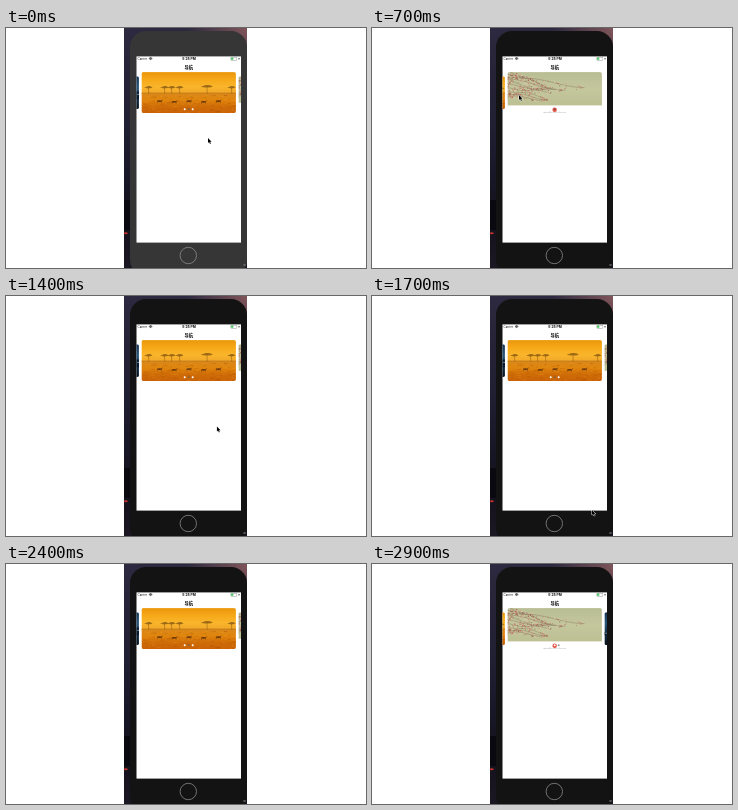
An HTML page with a canvas for the animation above (3 s loop, 360 by 240 pixels).

```html
<!DOCTYPE html>
<html lang="zh">
<head>
<meta charset="utf-8">
<style>
html, body { margin: 0; width: 100%; height: 100%; overflow: hidden; background: #fff; }
canvas { display: block; width: 360px; height: 240px; }
</style>
</head>
<body>
<canvas id="stage" width="360" height="240"></canvas>
<script>
const c = document.getElementById('stage').getContext('2d');
const LOOP = 3000, STEP = 100, MID = 182.7, PITCH = 97;
const CARD_W = 94.5, CARD_H = 41, CARD_Y = 64.6;

// Eased progress from 0 to 1 between two times.
function ramp(t, start, end) {
  const k = Math.min(1, Math.max(0, (t - start) / (end - start)));
  return k * k * (3 - 2 * k);
}

// Swipe forward, drag back, then advance automatically.
const pageAt = t => 1 + ramp(t, 500, 700) - ramp(t, 940, 1340) + ramp(t, 2400, 2800);

const cursorAt = t => [
  202 - 55 * ramp(t, 500, 700) + 57 * ramp(t, 750, 1100) + 16 * ramp(t, 1150, 1700),
  110 - 43 * ramp(t, 0, 450) + 147 * ramp(t, 1150, 1700)
];

function random(seed) {
  return () => (seed = (seed * 16807) % 2147483647) / 2147483647;
}

function rect(x, y, w, h, fill) {
  c.fillStyle = fill;
  c.fillRect(x, y, w, h);
}

function rounded(x, y, w, h, r, fill) {
  c.beginPath();
  c.roundRect(x, y, w, h, r);
  c.fillStyle = fill;
  c.fill();
}

function oval(x, y, rx, ry, fill) {
  c.beginPath();
  c.ellipse(x, y, rx, ry, 0, 0, 7);
  c.fillStyle = fill;
  c.fill();
}

function arc(x, y, r, color, width, start = 0, end = 7) {
  c.beginPath();
  c.arc(x, y, r, start, end);
  c.strokeStyle = color;
  c.lineWidth = width;
  c.stroke();
}

function line(points, color, width) {
  c.beginPath();
  points.forEach(p => c.lineTo(...p));
  c.strokeStyle = color;
  c.lineWidth = width;
  c.stroke();
}

function gradient(y0, y1, ...colors) {
  const g = c.createLinearGradient(0, y0, 0, y1);
  colors.forEach((color, i) => g.addColorStop(i / (colors.length - 1), color));
  return g;
}

function text(str, x, y, font, color, align = 'center') {
  c.font = font;
  c.textAlign = align;
  c.fillStyle = color;
  c.fillText(str, x, y);
}

// Card pictures use a local box of CARD_W by CARD_H.
function savanna() {
  rect(0, 0, CARD_W, 22, gradient(0, 22, '#eb970c', '#f6a918', '#fab52c', '#efa526'));
  rect(0, 21, CARD_W, 20, gradient(21, 41, '#d9881a', '#e0850d', '#cf6c07', '#c96206'));
  const rnd = random(11);
  for (let i = 0; i < 120; i++) {
    rect(rnd() * CARD_W, 23 + rnd() * 17, 1 + rnd() * 4, .6, i % 2 ? '#9a480555' : '#f3a02655');
  }
  rect(0, 20.4, CARD_W, 1, '#9c5c1870');
  for (const x of [7, 23, 30, 38, 65.5, 90]) {
    const r = x === 65.5 ? 6 : 4;
    const y = 17.5 - r / 2;
    line([[x, y], [x + .3, 21.5]], '#8a5314cc', .6);
    oval(x, y, r, .8, '#83540fb0');
    oval(x + .6, y - .8, r * .65, .8, '#83540fb0');
  }
  for (let i = 0; i < 5; i++) {
    const x = 18 + i * 14.7, y = 29 + i % 2 * .7;
    oval(x, y, 2.6, .9, '#6b390a');
    for (const dx of [-1.8, 1.8]) line([[x + dx, y], [x + dx * 1.2, y + 2.2]], '#6b390acc', .5);
    line([[x + 2, y], [x + 3, y - 1.5]], '#6b390a', .7);
  }
}

function blossom() {
  rect(0, 0, CARD_W, CARD_H, '#fff');
  rect(0, 0, CARD_W, 33.3, gradient(0, 33, '#b9bd94', '#c4c79d', '#bcc092'));
  const rnd = random(29);
  for (let i = 0; i < 10; i++) {
    const y = i * 2.9 - 2;
    const length = 36 + rnd() * 55 * (1 - i / 12);
    const drop = 13 - i * 1.3 + rnd() * 4;
    const pointAt = k => [length * k, y + drop * k + Math.sin(k * 7 + i) * 1.2];
    const points = Array.from({ length: 9 }, (_, j) => pointAt(j / 8));
    line(points, '#75604fb0', .5);
    for (let j = 0; j < 30; j++) {
      const [x, by] = pointAt(rnd() ** 1.3);
      oval(x, by + (rnd() - .5) * 4, .4 + rnd() * .4, .5,
        ['#b75a4dcc', '#d48b78', '#e5c8ae', '#943f38aa'][j % 4]);
    }
  }
  oval(47.2, 37.6, 2.2, 2.2, '#e2503f');
  text('spring blossom by the river', 47.2, 40.8, '1.8px Inter, sans-serif', '#999');
}

function night() {
  rect(0, 0, CARD_W, CARD_H, gradient(0, 41, '#16324f', '#28577c', '#122d44', '#07111c'));
  const rnd = random(5);
  for (let i = 0; i < 24; i++) {
    const x = i * 4, h = 4 + rnd() * 9;
    rect(x, 29 - h, 3.2, h, '#0b1a2c');
    rect(x + 1, 28 - h * .6, 1.3, 1.2, '#b9c9cc');
  }
}

function card(picture, offset) {
  const scale = 1 - .2 * Math.min(1, Math.abs(offset));
  c.save();
  c.translate(MID + offset * PITCH - CARD_W / 2, CARD_Y - CARD_H * scale / 2);
  c.scale(1, scale);
  c.beginPath();
  c.roundRect(0, 0, CARD_W, CARD_H, 2);
  c.clip();
  picture();
  c.restore();
}

function carousel(t) {
  c.save();
  c.beginPath();
  c.rect(130.5, 42, 104.5, 60);
  c.clip();
  const cards = [night, savanna, blossom];
  if (t > 2400) cards.push(night);
  cards.forEach((picture, i) => card(picture, i - pageAt(t)));
  // The dots follow only after the page has settled.
  const current = (t >= 800 && t < 1300) || t >= 2800 ? 2 : 1;
  for (let i = 0; i < 3; i++) {
    oval(MID + (i - 1) * 4, 81.2, 1, 1, i === current ? '#55555599' : '#fff');
  }
  c.restore();
}

function statusBar() {
  text('Carrier', 131.6, 32, '2.9px Inter, sans-serif', '#111', 'left');
  for (let r = .6; r < 3; r += .9) arc(144.6, 32.2, r, '#111', .8, -Math.PI * .75, -Math.PI * .25);
  text('9:28 PM', 183, 32, 'bold 3.3px Inter, sans-serif', '#111');
  rounded(224.5, 29, 6.6, 3.4, 1, '#999');
  rounded(224.9, 29.4, 5.8, 2.6, .7, '#fff');
  rounded(225.1, 29.6, 2.2, 2.2, .4, '#43c75d');
  oval(233, 30.7, .7, .7, '#333');
  text('导航', MID, 40.6, 'bold 4.3px "Noto Sans CJK SC", "Noto Sans CJK", sans-serif', '#111');
}

function phone(t) {
  rect(118, 0, 123, 240, gradient(0, 240, '#2d2940', '#262338', '#211f33', '#191828', '#13111b', '#1b1723'));
  const glow = c.createRadialGradient(241, 0, 0, 241, 0, 60);
  glow.addColorStop(0, '#80555a');
  glow.addColorStop(1, '#80555a00');
  rect(181, 0, 60, 60, glow);
  rect(118, 172, 6, 30, '#0a0910');
  oval(119.8, 205.3, 2, 1, '#c4302d');
  rounded(124, 3, 117, 245, 16, t < 600 ? '#363636' : '#131313');
  oval(238.5, 237, 1.4, .8, '#777');
  arc(182.3, 227.5, 8.2, '#8b8b8b', .8);
  rect(130.5, 28.4, 104.5, 186.2, '#fff');
}

function cursor(t) {
  if (t >= 1900) return;
  const [x, y] = cursorAt(t);
  const pressed = (t > 500 && t < 700) || (t > 900 && t < 1200);
  if (pressed) {
    oval(x, y, 8.3, 8.3, '#0000000d');
    arc(x, y, 8.3, '#151515', 1.3);
  }
  c.save();
  c.translate(x, y);
  c.scale(.9, .9);
  c.beginPath();
  [[0, 0], [0, 5.6], [1.3, 4.5], [2.2, 6.6], [3.2, 6.2], [2.3, 4.2], [4, 4.1]].forEach(p => c.lineTo(...p));
  c.closePath();
  c.strokeStyle = '#fff';
  c.lineWidth = 1;
  c.stroke();
  c.fillStyle = '#000';
  c.fill();
  c.restore();
}

function draw(t) {
  rect(0, 0, 360, 240, '#fff');
  phone(t);
  statusBar();
  carousel(t);
  cursor(t);
}

function tick(now) {
  draw(Math.floor(now % LOOP / STEP) * STEP);
  requestAnimationFrame(tick);
}
requestAnimationFrame(tick);
</script>
</body>
</html>
```
